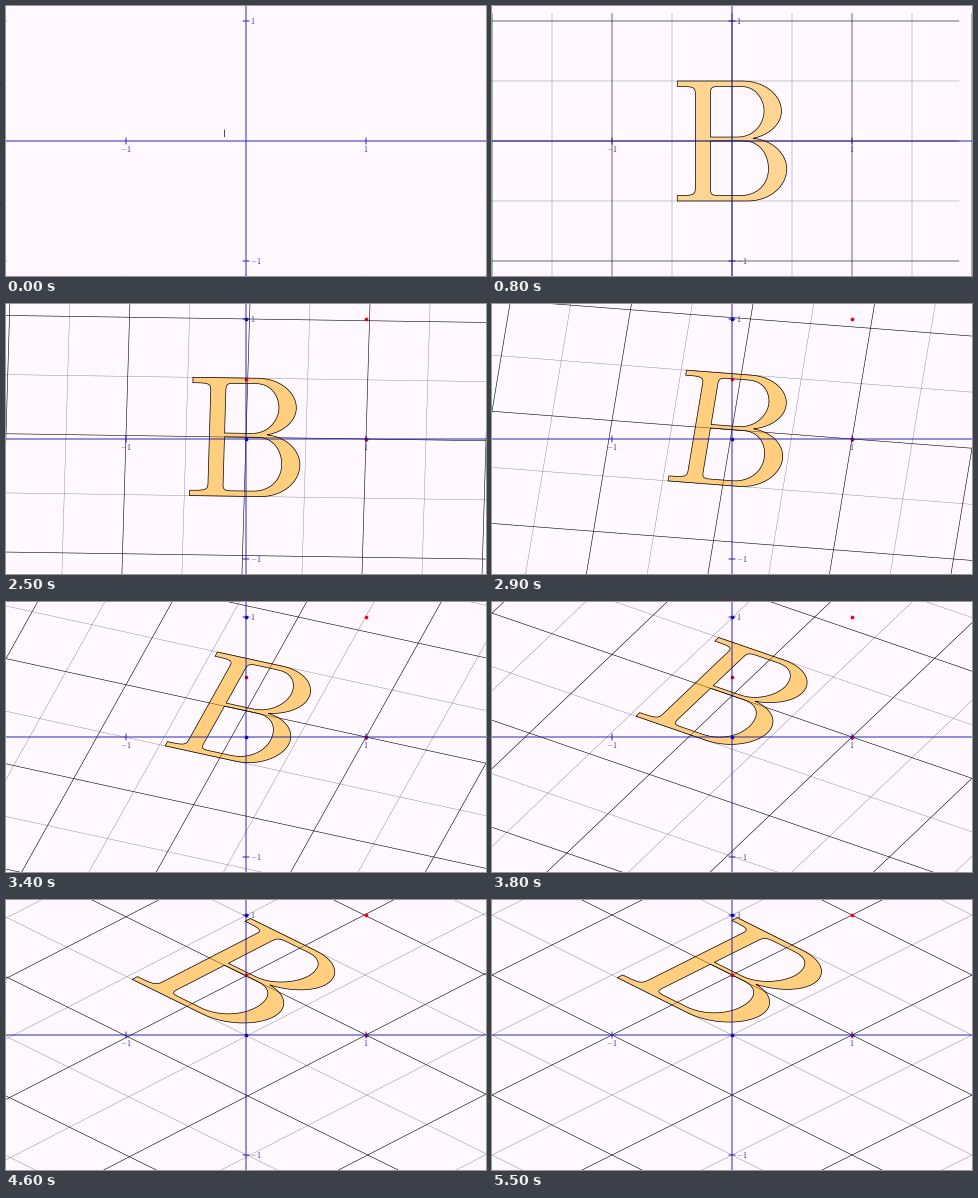
A matplotlib script for the animation above (6000 ms loop, 480 px wide and 270 px high).

```python
import numpy as np
import matplotlib.pyplot as plt
from matplotlib.animation import FuncAnimation
from matplotlib.collections import LineCollection
from matplotlib.patches import PathPatch
from matplotlib.path import Path

plt.rcParams["mathtext.fontset"] = "cm"

FPS, SECONDS = 10, 6
PX = 0.72  # points per pixel at 100 dpi
W, H = 2.0, 1.125  # half extents of the stage in plane units
AXIS = "#1414a8"

# Contours of the letter in font units: upper bowl, outline, lower bowl
LETTER = """
M 217 364 L 217 607 C 217 641 219 652 265 652 L 388 652
C 485 652 522 567 522 512 C 522 445 470 364 370 364 Z
M 460 357 C 551 375 621 437 621 512 C 621 600 528 683 399 683
L 28 683 L 28 652 L 52 652 C 128 652 131 641 131 605
L 131 78 C 131 42 128 31 52 31 L 28 31 L 28 0
L 427 0 C 562 0 651 90 651 182 C 651 268 572 346 460 357 Z
M 388 31 L 265 31 C 219 31 217 42 217 76 L 217 342 L 405 342
C 498 342 547 264 547 183 C 547 97 484 31 388 31 Z
"""


def smooth(u):
    u = np.clip(u, 0, 1)
    return u**3 * (10 - 15 * u + 6 * u * u)


def contours(text):
    """Sample each contour of the outline as a closed polyline."""
    shapes = []
    for part in text.split("Z")[:-1]:
        pts = []
        for word in part.replace("M", "|").replace("L", "|").replace("C", "|").split("|")[1:]:
            ctrl = np.array(word.split(), float).reshape(-1, 2)
            if len(ctrl) == 1:
                pts.append(ctrl[0])
                continue
            a, (b, c, d) = pts[-1], ctrl
            for u in np.linspace(0, 1, 17)[1:]:
                v = 1 - u
                pts.append(v**3 * a + 3 * v * v * u * b + 3 * v * u * u * c + u**3 * d)
        pts.append(pts[0])
        shapes.append((np.array(pts) - (339.5, 341.5)) / 683)
    return shapes


def partial(shapes, share):
    """Leading share of the total outline length."""
    steps = [np.hypot(*np.diff(s, axis=0).T) for s in shapes]
    left = share * sum(d.sum() for d in steps)
    out = []
    for s, d in zip(shapes, steps):
        if left <= 0:
            break
        run = np.r_[0, d.cumsum()]
        end = min(left, run[-1])
        tip = [np.interp(end, run, s[:, 0]), np.interp(end, run, s[:, 1])]
        out.append(np.vstack([s[run < end], tip]))
        left -= run[-1]
    return out


def warp(pts, s):
    x, y = np.asarray(pts, float).T
    return np.column_stack([x + s * y, s * (0.5 - 0.5 * x) + (1 - 0.5 * s) * y])


def grid(ticks, x0, x1, y0, y1):
    rows = [[(x0, k), (x1, k)] for k in ticks if y0 <= k <= y1]
    cols = [[(k, y0), (k, y1)] for k in ticks if x0 <= k <= x1]
    return rows + cols


fig = plt.figure(figsize=(4.8, 2.7), dpi=100, facecolor="#fff9ff")
ax = fig.add_axes([0, 0, 1, 1])
ax.set_xlim(-W, W)
ax.set_ylim(-H, H)
ax.axis("off")


def stroke(xs, ys):
    ax.plot(xs, ys, color=AXIS, lw=0.9 * PX, snap=False, zorder=8)


def label(x, y, text, ha):
    ax.text(x, y, text, size=8 * PX, color="#3c3c88", ha=ha, va="center", zorder=8)


stroke([-W, W], [0, 0])
stroke([0, 0], [-H, H])
for k, text in ((-1, "$-1$"), (1, "$1$")):
    stroke([k, k], [-0.025, 0.025])
    stroke([-0.025, 0.025], [k, k])
    label(k, -0.066, text, "center")
    label(0.036, k, text, "left")

MAJOR = np.arange(-7, 8)
MINOR = MAJOR + 0.5
minor = LineCollection([], colors="#808088", linewidths=0.42 * PX, snap=False, zorder=2)
major = LineCollection([], colors="black", linewidths=0.58 * PX, snap=False, zorder=3)
edge = LineCollection([], colors="black", linewidths=0.7 * PX, snap=False, zorder=5)
for lines in (minor, major, edge):
    ax.add_collection(lines)

SHAPES = contours(LETTER)
fill = PathPatch(Path.make_compound_path(*map(Path, SHAPES)), fc="orange", lw=0, zorder=4)
ax.add_patch(fill)

DOTS = [
    ax.scatter(*zip(*pts), s=(3.7 * PX) ** 2, c=color, linewidths=0, zorder=z)
    for pts, color, z in (
        ([(0, 0), (1, 0), (0, 1)], "#0000c8", 6),
        ([(0, 0.5), (1, 0), (1, 1)], "#f00014", 7),
    )
]


def draw(n):
    t = n / FPS
    intro = min(t + 0.05, 1)
    s = smooth((t - 2.05) / 2.9)

    if intro < 1:
        g = smooth(intro)
        box = (-W, W, -H, H)
        for lines, ticks in ((minor, MINOR), (major, MAJOR)):
            segs = np.array(grid(ticks, *box), float)
            segs[:, 1] = segs[:, 0] + g * (segs[:, 1] - segs[:, 0])
            lines.set_segments(segs)
    else:
        for lines, ticks in ((minor, MINOR), (major, MAJOR)):
            lines.set_segments([warp(seg, s) for seg in grid(ticks, -7, 7, -7, 7)])

    shapes = [warp(p, s) for p in SHAPES]
    edge.set_segments(partial(shapes, smooth(2 * intro)))
    fill.set_path(Path.make_compound_path(*map(Path, shapes)))
    fill.set_alpha(0.5 * smooth(2 * intro - 1))

    for dots in DOTS:
        dots.set_alpha(smooth(t - 1))
    return [minor, major, fill, edge, *DOTS]


anim = FuncAnimation(fig, draw, frames=FPS * SECONDS, interval=1000 / FPS,
                     repeat=True, repeat_delay=0, blit=False)
plt.show()
```
